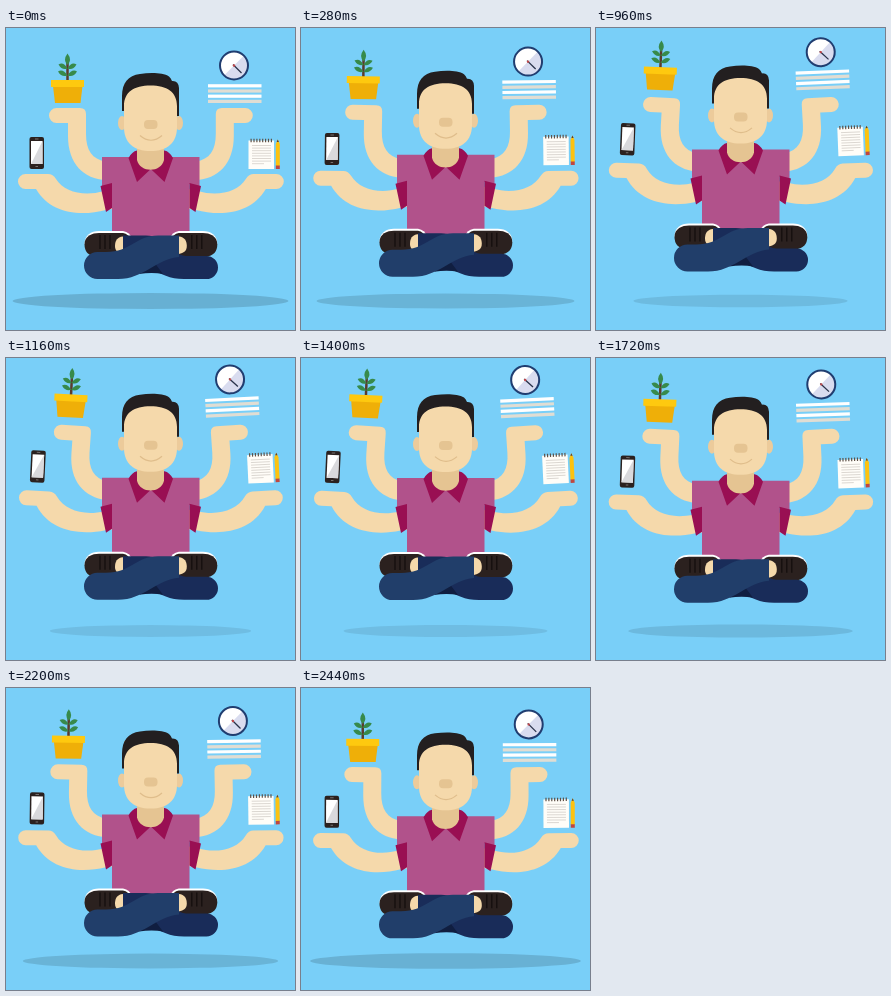
Recreate the animation shown at these times as an HTML page. Size 289 px wide and 302 px high, loop 2.52 s.

```html
<!DOCTYPE html>
<html lang="en">
<head>
<meta charset="utf-8">
<title>Floating multitasker</title>
<style>
html, body { margin: 0; width: 100%; height: 100%; overflow: hidden; background: #79cff8; }
svg { display: block; width: 100vw; height: 100vh; }
.skin { fill: #f5d9ab; }
.tan { fill: #e5c492; }
.plum { fill: #990f53; }
.shoe { fill: #2b211f; }
</style>
</head>
<body>
<svg viewBox="0 0 289 302">
  <defs>
    <path id="upArm" class="skin" d="M50.500 80H74Q80 80 80 86V106C80 122 86 131.500 100 133.500L112 135V152H100C78 151 62 136 62 108V95H50.500A7.500 7.500 0 0 1 50.500 80Z"/>
    <path id="lowArm" class="skin" d="M19.500 146H42Q47 146 50 151C58 164 78 169 98 163L112 160V180L100 182C73 189 44 185 30 161H19.500A7.500 7.500 0 0 1 19.500 146Z"/>
    <g id="foot">
      <path d="M78.500 216C78.500 207 85 203 93 203H117Q124 204 126 211L120 222H84Z" fill="#fff"/>
      <path class="shoe" d="M78.500 216.500C78.500 208 86 205 93 205H117Q123 206 124 212V229H90Q78.500 227 78.500 216.500Z"/>
      <path d="M94 207V221M99 207V221M104 207V221" stroke="#140f0e" stroke-width="1.300"/>
      <path class="skin" d="M117 208.500C111 209 109 213 109 218S112 225 117 226Z"/>
    </g>
    <g id="leaves" fill="#378a4b">
      <path d="M61.500 40.500Q57.500 33.500 52.500 36.500Q56 42.500 61.500 40.500Z"/>
      <path d="M61.500 47.500Q57 40.500 52 43.500Q55.500 49.500 61.500 47.500Z"/>
    </g>
    <clipPath id="dial"><circle cx="228" cy="37.500" r="14"/></clipPath>
  </defs>

  <ellipse id="shadow" cx="144.500" cy="273"/>

  <g id="upL"><use href="#upArm"/></g>
  <g id="upR"><use href="#upArm" transform="translate(289.800) scale(-1 1)"/></g>
  <g id="lowL"><use href="#lowArm"/></g>
  <g id="lowR"><use href="#lowArm" transform="translate(289.800) scale(-1 1)"/></g>

  <g id="body">
    <path d="M96 129H193.500V158.500L183.500 156V212H106V156L96 158.500Z" fill="#b1528b"/>
    <path class="plum" d="M94.500 158L106 155V180L100 184ZM195 158L183.500 155V180L189.500 184Z"/>
    <path class="plum" d="M131 122.500Q126 123.500 122.500 130L131 154 144.800 141 158.500 154 167 130Q163.500 123.500 158.500 122.500Z"/>
    <path class="tan" d="M131 115H158V132C155 145 134 145 131 132Z"/>
    <ellipse cx="116" cy="95" rx="4" ry="7" fill="#eccb9b"/>
    <ellipse cx="173" cy="95" rx="4" ry="7" fill="#eccb9b"/>
    <path class="skin" d="M118 56H171V99C171 115 161 123 144.500 123S118 115 118 99Z"/>
    <rect class="tan" x="138" y="92" width="13.500" height="9" rx="4"/>
    <path d="M134 107.500Q145 117 156 107.500" fill="none" stroke="#dfbd8b" stroke-width="1.200"/>
    <path d="M116 83V68C116 55 122 47.500 134 46C144 44.500 157 44.500 163 48.500Q165 50 166 53Q172.500 52.500 173 60V88H171V78C171 64 161 57.500 144.500 57.500S118 64 118 78V83Z" fill="#231f20"/>

    <use href="#foot"/>
    <use href="#foot" transform="translate(289.800) scale(-1 1)"/>
    <path d="M117 207.500V229C140 231 150 251 178 251H200.500A11.500 11.500 0 0 0 200.500 228H180C163 226 160 207.500 140 207.500Z" fill="#192c59"/>
    <path d="M133 246L148 234 157 246Q146 244 133 246Z" fill="#101e40"/>
    <path d="M173 207.500V229C150 231 138 251 112 251H91.500A13.500 13.500 0 0 1 91.500 224H100C125 224 130 207.500 152 207.500Z" fill="#213e6a"/>
  </g>

  <g id="plant">
    <path d="M61.500 32V53" stroke="#5b3c2c" stroke-width="2.500"/>
    <use href="#leaves"/>
    <use href="#leaves" transform="translate(123) scale(-1 1)"/>
    <path d="M61.500 25.500Q66.500 32 61.500 37Q56.500 32 61.500 25.500Z" fill="#378a4b"/>
    <path d="M47 58H76.500L74.500 75H49Z" fill="#efaf08"/>
    <rect x="45" y="52" width="33" height="7" fill="#fec90f"/>
  </g>

  <g id="phone">
    <rect class="shoe" x="23.500" y="109" width="14.500" height="32" rx="2"/>
    <path d="M25 113H36.500V136H25Z" fill="#fff"/>
    <path d="M36.500 113V136H25Z" fill="#d9d9dc"/>
    <path d="M29 111H32.500M29.500 138.500H32" stroke="#77706e"/>
  </g>

  <g id="clock">
    <circle cx="228" cy="37.500" r="14" fill="#fff"/>
    <path d="M213 52.500L243 22.500V52.500Z" fill="#d9dcef" clip-path="url(#dial)"/>
    <circle cx="228" cy="37.500" r="14" fill="none" stroke="#203d70" stroke-width="2"/>
    <path d="M227 36.500L235.500 45" stroke="#29324a" stroke-width="1.300"/>
    <circle cx="228" cy="37.500" r="1.200" fill="#c0474a"/>
  </g>

  <g id="papers"></g>

  <g id="pad">
    <rect x="242.500" y="112.500" width="25.500" height="28.500" fill="#fffdf8"/>
    <path d="M244.500 112.500H267" stroke="#5d5148" stroke-width="3.500" stroke-dasharray="1.200 1.700"/>
    <path id="rules" stroke="#d3cec8" stroke-width=".8"/>
    <path d="M269.800 138V116L271.800 111.500 273.800 116V138Z" fill="#fdc20f"/>
    <path d="M270.700 114L271.800 111.500 272.900 114Z" fill="#5b3c2c"/>
    <path d="M269.800 137.500H273.800V141H269.800Z" fill="#c0473f"/>
  </g>
</svg>
<script>
const STEP = 40, LOOP = 2520, LAST = 61;
const el = id => document.getElementById(id);

// Travel at the top of the float: [id, dx, dy, degrees, pivot x, pivot y]
const parts = [
  ['body', 0, -10, 0, 0, 0],
  ['upL', 0, -10, 4.3, 112, 156],
  ['upR', 0, -10, -4.3, 177.8, 156],
  ['lowL', 0, -10, 3, 112, 172],
  ['lowR', 0, -10, -3, 177.8, 172],
  ['plant', 3.3, -17, 3, 61.5, 63],
  ['phone', 1.2, -18, 3, 31, 125],
  ['clock', -4.3, -17.5, -3, 228, 37.5],
  ['papers', -2.7, -18, -3, 228.5, 65.5],
  ['pad', -0.9, -17.5, -3, 258, 126]
].map(([id, ...move]) => [el(id), ...move]);

el('papers').innerHTML = [0, 1, 2, 3].map(i =>
  `<rect x="202" y="${56.2 + i * 5.2}" width="53.5" height="3.2" fill="${i % 2 ? '#e0ddd3' : '#fff'}"/>`
).join('');
el('rules').setAttribute('d',
  Array.from({ length: 8 }, (_, i) => `M246 ${117.5 + i * 2.6}H${i === 7 ? 258 : 265}`).join(''));

function pose(p) {
  for (const [node, dx, dy, deg, cx, cy] of parts) {
    node.setAttribute('transform',
      `translate(${dx * p} ${dy * p}) rotate(${deg * p} ${cx} ${cy})`);
  }
  const shadow = el('shadow');
  shadow.setAttribute('rx', 138 - 40.5 * p);
  shadow.setAttribute('ry', 8 - 2.2 * p);
  shadow.setAttribute('fill-opacity', 0.15 - 0.07 * p);
}

const start = performance.now();
function tick() {
  const t = (performance.now() - start) % LOOP;
  const k = Math.min(Math.floor(t / STEP), LAST);
  pose(1 - Math.abs(1 - 2 * k * STEP / LOOP));
  requestAnimationFrame(tick);
}
tick();
</script>
</body>
</html>
```
